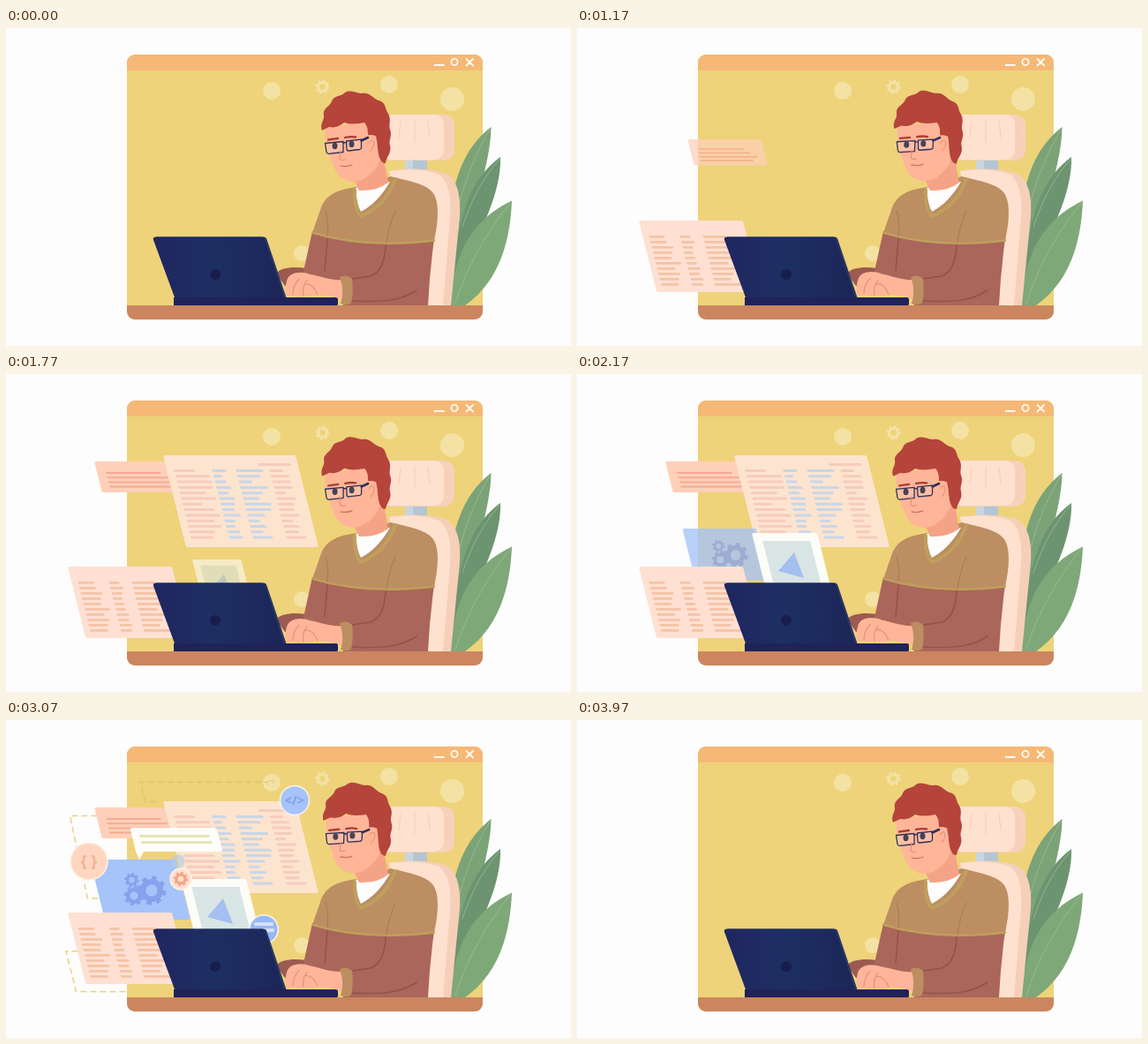
An HTML page that plays this animation: 640x360 px, repeating every 4010 ms.

```html
<!DOCTYPE html>
<html lang="en">
<head>
<meta charset="utf-8">
<style>
html, body { margin: 0; width: 100%; height: 100%; overflow: hidden; background: #fdfdfd; }
svg { display: block; width: 100vw; height: 100vh; }
text { font: 600 15px "Noto Sans", sans-serif; text-anchor: middle; }
.line { fill: none; stroke-linecap: round; stroke-linejoin: round; }
.dash { fill: none; stroke: #ecd081; stroke-width: 1.5; stroke-dasharray: 7 4; }
</style>
</head>
<body>
<svg viewBox="0 0 640 360">
  <defs>
    <clipPath id="frame"><rect x="137" y="30" width="403" height="300" rx="9"/></clipPath>
    <linearGradient id="lid">
      <stop offset="0" stop-color="#202660"/><stop offset=".45" stop-color="#1d2f62"/><stop offset="1" stop-color="#1c2658"/>
    </linearGradient>
  </defs>

  <!-- window -->
  <g clip-path="url(#frame)">
    <path fill="#eed37a" d="M137 30h403v300H137z"/>
    <path fill="#f5b876" d="M137 30h403v18H137z"/>
    <path fill="#cb8660" d="M137 314h403v16H137z"/>
  </g>
  <g class="line" stroke="#fffaf0" stroke-width="1.800">
    <path d="M485.500 42h10.500M521.500 35l7.500 7.500M529 35l-7.500 7.500"/><circle cx="508" cy="38.500" r="3.600"/>
  </g>
  <g fill="#f4e2a4">
    <circle cx="301" cy="71" r="10"/><circle cx="434" cy="64" r="10"/>
    <circle cx="505.500" cy="80.500" r="13.500"/><circle cx="335" cy="255" r="9"/>
  </g>
  <g id="wallGear"></g>

  <g id="cards"></g>

  <!-- plant -->
  <path fill="#7ba377" d="M500 300C499 210 503 148 549.500 112C549 150 533 195 505 300z"/>
  <path fill="#6c9470" d="M505 300C510 215 525 172 560 146C561 180 545 220 512 280z"/>
  <path fill="#7fa878" d="M503 314C507 252 530 216 573 195.500C571 245 557 288 520 314z"/>
  <g class="line" stroke="#9dbd94" stroke-width=".8">
    <path d="M505 240C511 200 524 155 548 115M517 225C527 195 541 168 559 149M509 312C522 270 544 232 571 198"/>
  </g>

  <!-- chair -->
  <path fill="#b4c5d4" d="M452 146h25v20h-25z"/><path fill="#c9d6e0" d="M452 146h9v20h-9z"/>
  <path fill="#f6cfb8" d="M434 162C460 157 492 160 502 167C513 176 515 195 514 213L504 314H470z"/>
  <path fill="#ffe1d0" d="M434 162C456 159 480 160 492 167C503 177 504 196 503 214L495 314H465z"/>
  <rect x="425" y="98" width="83" height="52" rx="12" fill="#f8d1bb"/>
  <rect x="425" y="98" width="71" height="51" rx="11" fill="#ffe1d0"/>
  <path class="line" stroke="#f5ccb5" d="M447 107l-2 17M463 105v24M478 106l2 18M499 109l1 27"/>

  <!-- body -->
  <path fill="#9c5a50" d="M340 272C326 270 311 271 306 278L316 292L346 289z"/>
  <path fill="#aa665a" d="M347 230L336 280L350 292L380 286L382 314H478Q480 275 485 239z"/>
  <path fill="#bc8e62" d="M398 180C375 183 362 188 356 206L347 232Q410 251 485 241C490 218 491 198 484 187C476 176 455 173 436 168z"/>
  <path class="line" stroke="#bf9f5c" stroke-width="2.500" d="M348 232Q408 250 485 240.500"/>
  <path class="line" stroke="#935249" stroke-width="1.500" d="M364 239L361 275M430 246C429 264 425 276 413 281L392 284M392 309C430 311 448 308 465 297"/>
  <path class="line" stroke="#a67a54" d="M441 207Q433 225 431 243M362 207Q366 222 364 235"/>
  <path fill="#fdfdfd" d="M396 181Q397 199 402 208Q421 198 435 174z"/>
  <path class="line" stroke="#bf9f5c" stroke-width="4" stroke-linecap="butt" d="M395 183Q394 205 402 213Q430 202 441 171"/>
  <path fill="#f5a387" d="M388 158L400 184Q420 185 433 175L427 143z"/>

  <!-- head -->
  <g id="head">
    <path fill="#ffb598" d="M361 112Q362 137 369 151C374 169 386 178 403 172Q419 164 424 148V105z"/>
    <path fill="#b5443a" d="M358 116C355 108 361 104 360 99C358 91 367 89 369 83C371 76 380 78 384 73C391 69 397 74 403 74C412 72 416 80 422 82C431 84 429 92 433 97C437 104 433 109 435 115C438 122 433 127 435 133C437 142 431 145 430 153Q424 153 422 143L419 122L410 121Q410 111 406 107Q391 110 383 107Q375 114 366 112z"/>
    <ellipse cx="414.500" cy="132" rx="6" ry="11" fill="#ffb598"/>
    <path class="line" stroke="#e58f76" d="M411 130Q416 123 417 131Q416 136 413 139"/>
    <g class="line" stroke="#a83f36" stroke-width="2.300"><path d="M365 126.500l11-1.500M384 124q7-1.500 12-.5"/></g>
    <g fill="#28263c"><ellipse cx="372.500" cy="133.500" rx="3" ry="3.700"/><ellipse cx="391.500" cy="131.500" rx="3" ry="3.700"/></g>
    <g class="line" stroke="#2f3058" stroke-width="1.300">
      <path fill="#fff2" d="M361.500 130.500l20.500-2v12l-16.500 1.800q-2 0-2.500-2zM385.500 128l17-1.800v9q0 2-2 2.300l-12.500 1.500q-2 0-2-2z"/>
      <path d="M382 130l3.500-.4"/><path stroke-width="2.600" d="M402.500 127.500l7.500-3.500"/>
    </g>
    <path class="line" stroke="#e58f76" stroke-width="1.200" d="M379 139l-1 9q2 2.500 6 1"/>
    <path class="line" stroke="#c9705c" stroke-width="1.200" d="M379 156q7 1.500 13-1"/>
  </g>

  <!-- laptop -->
  <path fill="#2b3866" d="M170 236.500H292q2.500 0 3.500 3L317.500 305H192z"/>
  <path fill="url(#lid)" d="M170 236.500H290q2.500 0 3.500 3L315 305H191L167 240q-1-3.500 3-3.500z"/>
  <circle cx="237" cy="279" r="6" fill="#191d4b"/>
  <path fill="#20225a" d="M190 305H374q2 0 2 2v6q0 1-2 1H190z"/>

  <!-- typing hand -->
  <g id="hand">
    <path fill="#ffb598" d="M382 285C367 286 357 281 345 279C334 275 321 276 318 286Q315 297 318 303Q321 305 325 302Q332 306 337 303Q347 305 353 302Q368 302 383 308z"/>
    <path class="line" stroke="#e58f76" stroke-width="1.100" d="M332 284q-7 7-7 18M341 286q-6 7-4 17M339 290q9-1 14 12"/>
  </g>
  <path fill="#bc8e62" d="M378 282Q386 278 392 284Q394 299 391 311Q387 315 379 312Q384 297 378 282z"/>
</svg>

<script>
const LOOP = 4010, LEAN = 0.25;
const $ = id => document.getElementById(id);
const clamp = v => Math.max(0, Math.min(1, v));

let seed = 11;
const rand = () => (seed = seed * 16807 % 2147483647) / 2147483647;

const rect = (x, y, w, h, fill, r = 0) =>
  `<rect x="${x}" y="${y}" width="${w}" height="${h}" rx="${r}" fill="${fill}"/>`;
const leaning = (x, y, body) => `<g transform="matrix(1 0 ${LEAN} 1 ${x} ${y})">${body}</g>`;
const disc = (x, y, r, fill, body = "") =>
  `<circle cx="${x}" cy="${y}" r="${r}" fill="${fill}" stroke="#fff3e6" stroke-width="1.5"/>${body}`;
const label = (x, y, size, color, text) =>
  `<text x="${x}" y="${y}" style="font-size:${size}px" fill="${color}">${text}</text>`;
const gear = (x, y, r, color) => `<g fill="none" stroke="${color}">
  <circle cx="${x}" cy="${y}" r="${r * .62}" stroke-width="${r * .4}"/>
  <circle cx="${x}" cy="${y}" r="${r * .9}" stroke-width="${r * .25}" pathLength="16" stroke-dasharray="1 1"/></g>`;

// Rows of bars in columns given as [x, shortest, longest, color].
function bars(rows, top, step, height, columns) {
  let out = "";
  for (let i = 0; i < rows; i++)
    for (const [x, min, max, color] of columns)
      out += rect(x, top + i * step, min + rand() * (max - min), height, color, height / 2);
  return out;
}

const ORANGE = "#f4c3a6", PINK = "#f6cbbd", BLUE = "#c9d6e8", SKY = "#a6c4fa", INDIGO = "#86a2ec";

const listCard = leaning(70, 218, rect(0, 0, 118, 81, "#ffe0d2", 2) +
  bars(10, 17, 6, 2.8, [[7, 18, 31, ORANGE], [42, 9, 16, ORANGE], [68, 20, 40, ORANGE]]));

const smallCard = leaning(100, 99, rect(0, 0, 99, 35, "#ffd0b9", 2) +
  bars(4, 12, 5.2, 2, [[10, 62, 80, "#f6aa94"]]));

const bigCard = leaning(178, 92, rect(0, 0, 150, 104, "#fde4cf", 2) +
  rect(105, 9, 37, 3, PINK, 1.5) +
  bars(13, 16, 6.3, 3, [[8, 22, 41, PINK], [51, 10, 20, BLUE], [78, 12, 32, BLUE], [116, 12, 24, PINK]]));

const blueCard = leaning(95, 158, rect(0, 0, 97, 68, SKY, 2)) +
  gear(165, 193, 16, INDIGO) + gear(142.5, 181, 8, INDIGO) + gear(145, 199, 11, INDIGO);

const pictureCard = leaning(198, 180, rect(0, 0, 74, 90, "#fdfdf8", 2) + rect(10, 9, 54, 72, "#d9e5e4")) +
  `<path fill="#a4bff0" d="M228 223L246 202L257 231z"/>`;

const bubble = `<path fill="#fdfdf9" d="M143 122H236q2 0 3 2l6 23q0 2-2 2H156l-5 9-4-9-6-25q0-2 2-2z"/>` +
  leaning(151, 130, rect(0, 0, 79, 3, "#e3e5b8") + rect(0, 7, 80, 3, "#e3e5b8"));

// [start, origin x, origin y, markup], back to front
const cards = [
  [2660, 180, 200, `<path class="dash" d="M103 108H72L92 202H110M92 262H67.500L79 308H140"/>
    <path class="dash" style="stroke:#e0c26c" d="M170 92H158L152 70H296"/>`],
  [945, 262, 272, smallCard],
  [1265, 277, 279, bigCard],
  [1935, 270, 280, blueCard],
  [600, 277, 279, listCard],
  [1590, 250, 300, pictureCard],
  [2290, 218, 236, bubble],
  [2630, 94, 160, disc(94, 160, 21, "#ffd6bf", label(94, 166, 18, "#f0b192", "{ }"))],
  [2630, 327, 91, disc(327, 91, 16.5, SKY, label(327, 96, 14, "#7f9ce8", "&lt;/&gt;"))],
  [2830, 195, 160, `<circle cx="195" cy="160" r="9" fill="#b7cbe0" opacity=".8"/>`],
  [2660, 198, 180, disc(198, 180, 12, "#ffdfcf", gear(198, 180, 8, "#f5a587"))],
  [2700, 292, 237, disc(292, 237, 16.5, "#98b8f4", rect(281, 229, 22, 4, "#d5e0f4", 1) + rect(284, 236, 20, 4, "#d5e0f4", 1))],
  [2830, 301, 71, `<path class="line" stroke="#e8cd84" stroke-width="1.5" d="M296 75v-6h9M302 66l3 3-3 3"/>`]
];

$("wallGear").innerHTML = gear(358.5, 66.5, 8, "#f4e2a4");
$("cards").innerHTML = cards.map(card => `<g>${card[3]}</g>`).join("");
const nodes = [...$("cards").children];

function draw(now) {
  const t = now % LOOP;
  const leave = clamp((t - 3665) / 300);
  cards.forEach(([start, x, y], i) => {
    const u = clamp((t - start) / 490);
    const k = (1 - (1 - u) ** 3) * (1 - leave ** 3);
    nodes[i].setAttribute("transform", `translate(${x * (1 - k)} ${y * (1 - k)}) scale(${k})`);
    nodes[i].setAttribute("opacity", clamp(u * 1.6) * clamp((1 - leave) * 1.6));
  });
  const nod = (1 - Math.cos(t / LOOP * 4 * Math.PI)) / 2;
  $("head").setAttribute("transform", `rotate(${2.4 * nod} 407 152)`);
  $("hand").setAttribute("transform", `rotate(${.9 * Math.sin(t / LOOP * 16 * Math.PI)} 384 297)`);
  requestAnimationFrame(draw);
}
requestAnimationFrame(draw);
</script>
</body>
</html>
```
